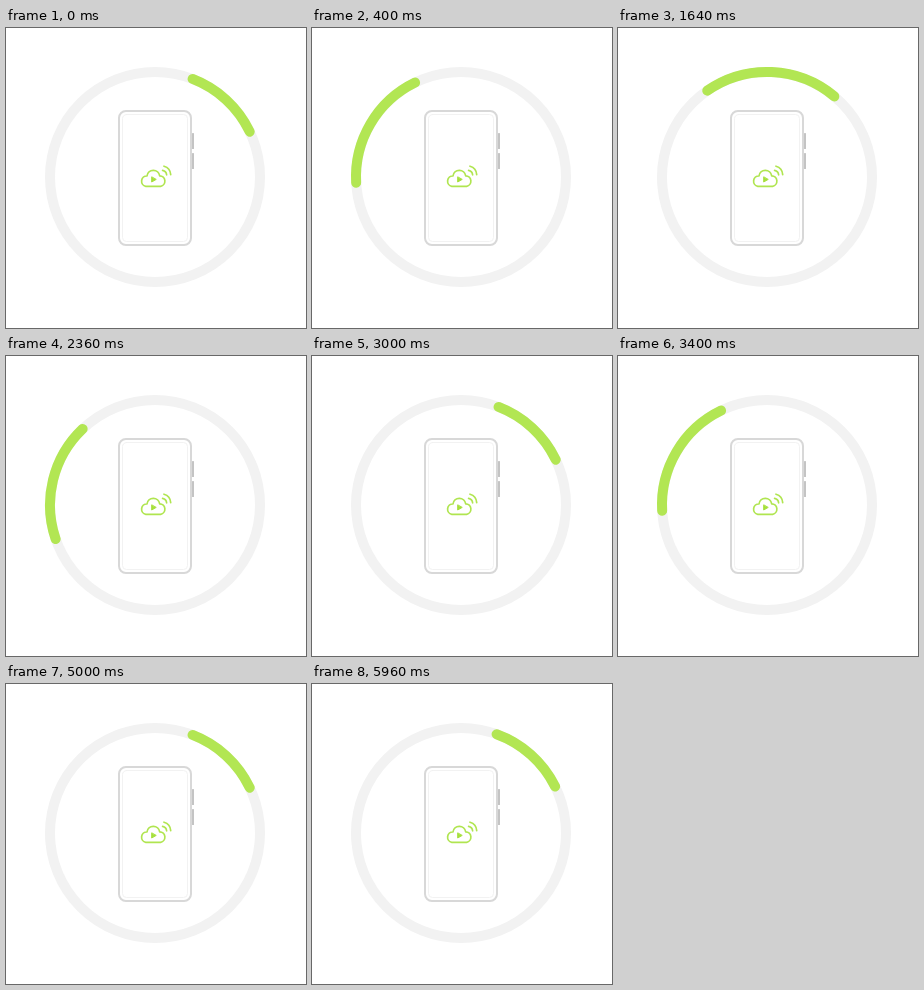
Animation of 300x300 px, one loop 6 s. Source, as an HTML page:

```html
<!DOCTYPE html>
<html lang="en">
<head>
<meta charset="utf-8">
<title>Loading</title>
<style>
  html, body { margin: 0; width: 100%; height: 100%; overflow: hidden; background: #fff; }
  svg { display: block; width: 300px; height: 300px; }
</style>
</head>
<body>
<svg viewBox="0 0 300 300" fill="none" stroke-linecap="round" stroke-linejoin="round">
  <circle cx="149" cy="149" r="105" stroke="#f2f2f2" stroke-width="10"/>
  <path id="arc" stroke="#b2e653" stroke-width="10"/>

  <!-- phone -->
  <rect x="186" y="105" width="2" height="16" rx=".6" fill="#c4c4c4"/>
  <rect x="186" y="125" width="2" height="16" rx=".6" fill="#c4c4c4"/>
  <rect x="113" y="83" width="72" height="134" rx="7" fill="#fff" stroke="#d8d8d8" stroke-width="2"/>
  <rect x="116.5" y="86.5" width="65" height="127" rx="4" stroke="#f2f2f2"/>

  <!-- cloud with play and signal -->
  <g stroke="#b0e550" stroke-width="1.7">
    <path d="M139.800 158.300a5.200 5.200 0 0 1 1.200-10.300a6.400 6.400 0 0 1 12.700-.2a5.300 5.300 0 0 1 .9 10.500z"/>
    <path d="M156.600 142.300a5 5 0 0 1 4 4.500M158 138.200a9.300 9.300 0 0 1 6.700 8.400"/>
    <path d="M145.700 149.200v4.800l4.200-2.400z" fill="#a6e03c" stroke="#a6e03c" stroke-width="1"/>
  </g>
</svg>
<script>
const arc = document.getElementById('arc');
const PERIOD = 1000, CENTER = 149, RADIUS = 105;
const START = -69.5, LENGTH = 43.4, STRETCH = 32;

// Cubic bezier easing, solved for x by bisection
function bezier(x1, y1, x2, y2) {
  const at = (a, b, t) => 3 * a * t * (1 - t) ** 2 + 3 * b * t * t * (1 - t) + t ** 3;
  return x => {
    let lo = 0, hi = 1;
    for (let i = 0; i < 24; i++) {
      const mid = (lo + hi) / 2;
      if (at(x1, x2, mid) < x) lo = mid; else hi = mid;
    }
    return at(y1, y2, lo);
  };
}

const spin = bezier(.2, .28, .25, 1);
const catchUp = bezier(.25, .1, .25, 1);
const clamp = v => Math.min(1, Math.max(0, v));

function point(deg) {
  const a = deg * Math.PI / 180;
  return (CENTER + RADIUS * Math.cos(a)).toFixed(3) + ' ' + (CENTER + RADIUS * Math.sin(a)).toFixed(3);
}

function draw(now) {
  const p = now % PERIOD / PERIOD;
  const turn = START + (360 - STRETCH) * spin(p);
  // The head runs ahead for three quarters of a turn cycle, then the tail follows.
  const head = turn + LENGTH + STRETCH * Math.sin(clamp(p / .75) * Math.PI / 2);
  const tail = turn + STRETCH * catchUp(clamp((p - .75) / .25));
  arc.setAttribute('d', `M${point(tail)}A${RADIUS} ${RADIUS} 0 0 1 ${point(head)}`);
}

const begin = performance.now();
function tick() {
  draw(performance.now() - begin);
  requestAnimationFrame(tick);
}
tick();
</script>
</body>
</html>
```
